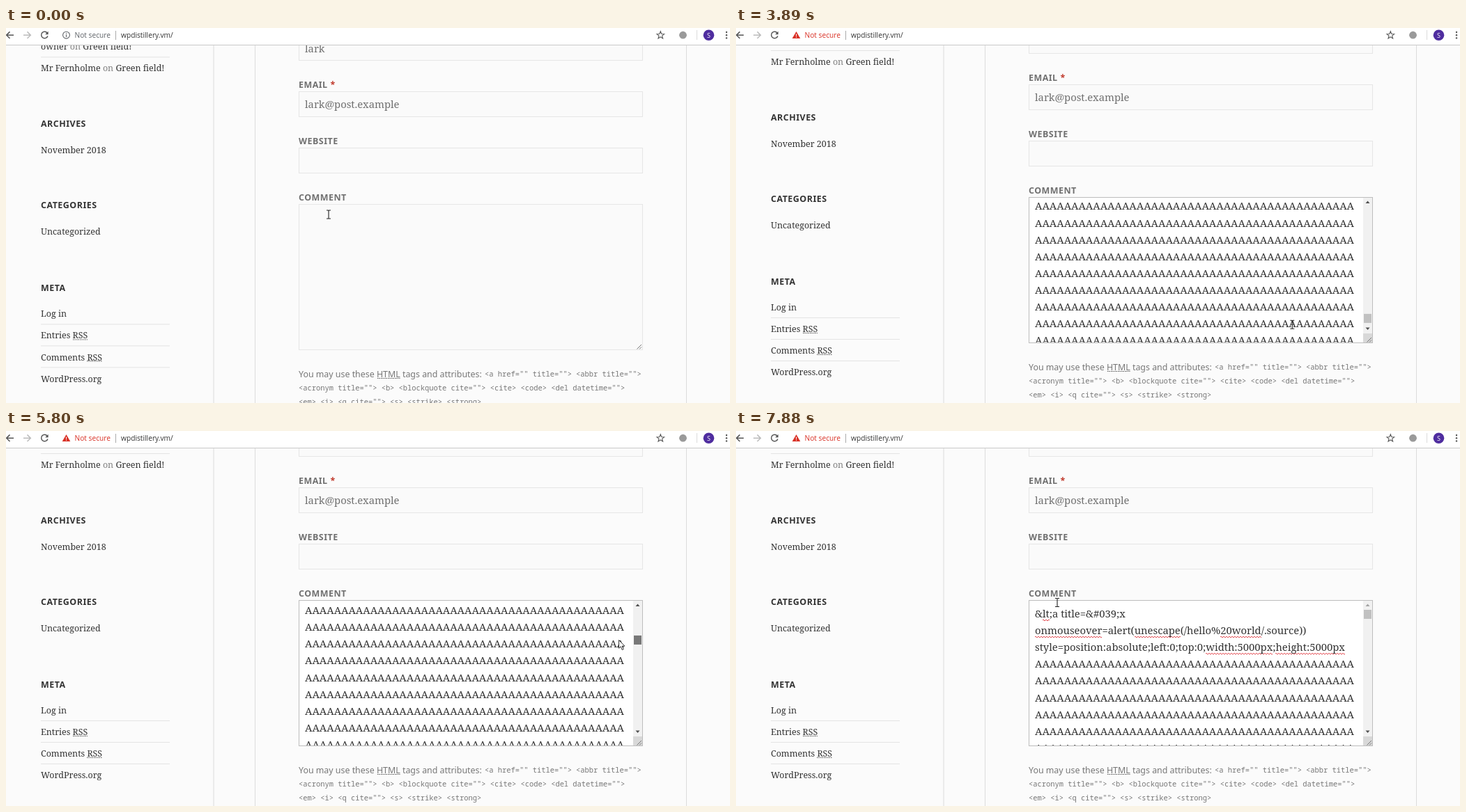
An HTML page that plays this animation: 1039x539 px, repeating every 8000 ms.

```html
<!DOCTYPE html>
<html lang="en">
<head>
<meta charset="utf-8">
<title>Comment form</title>
<style>
  html, body { margin: 0; width: 100%; height: 100%; overflow: hidden; background: #fbfbfb; }
  svg { position: absolute; left: 0; top: 0; }
  text { white-space: pre; }
  .serif { font: 12.48px "Noto Serif", serif; fill: #333; }
  .input { font: 14.77px "Noto Serif", serif; fill: #707070; }
  .head { font: bold 12.45px "Noto Sans", sans-serif; letter-spacing: .04em; fill: #333; }
  .label { fill: #707070; }
  .note { font: 12.4px "Noto Sans", sans-serif; fill: #777; }
  .code { font: 10.42px "Noto Sans Mono", monospace; fill: #777; }
  .bar { font: 10.2px "Open Sans", sans-serif; fill: #333; }
  .soft { fill: #808080; }
  .rule { stroke: #e4e4e4; }
  .dots { stroke: #555; stroke-dasharray: 1.5 1; }
  .field { fill: #fafafa; stroke: #e6e6e6; }
  .focus { fill: #fff; stroke: #bdbdbd; }
  #area { position: absolute; left: 421px; top: 244px; width: 479px; height: 208px; overflow: hidden; }
  #area div { position: absolute; left: 8px; top: 8.3px; white-space: pre; color: #333;
    font: 14.77px/20px "Noto Serif", serif; }
  #area u { text-decoration: none; padding-bottom: 1px;
    background: linear-gradient(90deg, #e2444a 50%, transparent 0) 0 calc(100% - 1px) / 4px 1px repeat-x,
      linear-gradient(90deg, #e2444a 50%, transparent 0) 2px 100% / 4px 1px repeat-x; }
  #area #caret { left: 7px; top: 9px; width: 1px; height: 20px; background: #222; }
</style>
</head>
<body>
<svg id="page" width="1039" height="539"></svg>
<div id="area"></div>
<svg id="top" width="1039" height="539"></svg>
<script>
const LOOP = 8000, STEP = 137;
const SCROLL = 140, FOCUS = 550, PASTE = 3090, MOVE = 3455, GRAB = 5370, DROP = 6740;
const LINE = 24.12, LAST = 1489, MAX = LAST - 7, WHEELED = MAX - 21.46;
const $ = id => document.getElementById(id);
const esc = s => s.replace(/&/g, '&amp;').replace(/</g, '&lt;');

const label = (x, y, s, cls, id = '') => `<text id="${id}" x="${x}" y="${y}" class="${cls}">${s}</text>`;
const rule = (x1, x2, y, cls = 'rule') => `<path d="M${x1} ${y}H${x2}" class="${cls}"/>`;
const field = (y, h, id = '') =>
  `<rect id="${id}" class="field" x="420.5" y="${y}" width="493" height="${h}"/>`;
const entry = (y, who) =>
  label(50, y, `${who}<tspan class="soft"> on </tspan>Green field!`, 'serif');

// A heading with ruled links below it
const widget = (y, title, links) => label(50, y, title, 'head') + links.map((s, i) =>
  label(50, y + 37.5 + 31.1 * i, s, 'serif') +
  (i ? rule(50, 235, Math.round(y + 16.6 + 31.1 * i) + .5) : '')).join('');

const side = [
  entry(22, 'owner'), rule(50, 235, 32.5), entry(52.6, 'Mr Fernholme'),
  widget(133, 'ARCHIVES', ['November 2018']),
  widget(250, 'CATEGORIES', ['Uncategorized']),
  widget(368.5, 'META', ['Log in', 'Entries RSS', 'Comments RSS', 'WordPress.org']),
  rule(96, 117, 438.5, 'dots'), rule(116, 138, 469.5, 'dots')
].join('');

const tags = [
  '<a href="" title=""> <abbr title="">',
  '<acronym title=""> <b> <blockquote cite=""> <cite> <code> <del datetime="">',
  '<em> <i> <q cite=""> <s> <strike> <strong>'
];
const form = [
  field(.5, 36), label(429, 25, 'lark', 'input'),
  label(420, 76.3, 'EMAIL <tspan fill="#c0392b">*</tspan>', 'head label'),
  field(81.5, 36), label(429, 104.8, 'lark@post.example', 'input'),
  label(420, 157, 'WEBSITE', 'head label'), field(162.5, 36),
  label(420, 238, 'COMMENT', 'head label'), field(243.5, 209, 'box'),
  label(420, 491.7, 'You may use these HTML tags and attributes:', 'note'),
  rule(533, 566, 493.5, 'dots'),
  ...tags.map((s, i) => label(i ? 420 : 687, 491.3 + 19.6 * i, esc(s), 'code'))
].join('');

$('page').innerHTML = `
  <path d="M298 24V539M357.5 24V539M976.5 24V539" stroke="#dcdcdc"/>
  <g id="side">${side}</g><g id="form">${form}</g>`;

const star = Array.from({ length: 10 }, (_, i) => {
  const r = i % 2 ? 2.4 : 5.6, a = i * Math.PI / 5;
  return `${939.3 + r * Math.sin(a)},${10.4 - r * Math.cos(a)}`;
}).join(' ');
const menu = [-1, 0, 1].map(i => `<circle cx="1034" cy="${10.2 + 4.2 * i}" r="1.2" fill="#555"/>`).join('');

$('top').innerHTML = `
  <g id="scroll">
    <path d="M900 244H913V439H900Z" fill="#f1f1f1"/>
    <path d="M900 439H913V452H900Z" fill="#d8d8d8"/>
    <path id="up" d="M903.5 252L906.5 248.5L909.5 252Z"/>
    <path id="down" d="M903.5 430.5L906.5 434L909.5 430.5Z"/>
    <rect id="thumb" x="901" width="11" height="13"/>
  </g>
  <path id="grip" d="M905.5 451.5L912 445M909 451.5L912 448.5" stroke="#777"/>
  <path id="arrow" d="M.5 .5V12.3L3.2 9.8L5.2 14.5L7.2 13.7L5.2 9.1H8.9Z"
    fill="#fff" stroke="#222" stroke-width=".9"/>
  <path id="beam" d="M-3 -6H-.8L0 -5.4L.8 -6H3M0 -5.4V5.4M-3 6H-.8L0 5.4L.8 6H3"
    fill="none" stroke="#222" stroke-width="1.1"/>
  <path d="M0 0H1039V24H0Z" fill="#fff"/>
  <path d="M0 24.5H1039" stroke="#c9c9c9"/>
  <g fill="none" stroke-width="1.5">
    <path d="M11 10.2H1M5.5 5.4L.7 10.2L5.5 15" stroke="#555"/>
    <path d="M25 10.2H35M30.5 5.4L35.3 10.2L30.5 15" stroke="#bcbcbc"/>
    <path d="M59.2 7.2A4.7 4.7 0 1 0 59.9 11.4" stroke="#555"/>
    <polygon points="${star}" stroke="#555" stroke-width="1.1"/>
  </g>
  <path d="M60.6 4.8V9.2H56.2Z" fill="#555"/>
  <g id="info"><circle cx="86.5" cy="10.2" r="4.9" fill="none" stroke="#5f6368" stroke-width="1.1"/>
    <path d="M86.5 9.4V13M86.5 7.2V8.4" stroke="#5f6368" stroke-width="1.2"/></g>
  <g id="warn"><path d="M86.5 5L92.3 15H80.7Z" fill="#d93025"/>
    <path d="M86.5 8.4V11.6M86.5 12.5V13.7" stroke="#fff" stroke-width="1.1"/></g>
  ${label(98.5, 14, 'Not secure', 'bar', 'secure')}
  <path d="M157.5 4V17" stroke="#aaa"/>
  ${label(165, 14, 'wpdistillery.vm/', 'bar')}
  <circle cx="971.5" cy="10.2" r="5.4" fill="#9a9a9a"/>
  <path d="M991.5 3V17" stroke="#dcdcdc"/>
  <circle cx="1008.5" cy="10.2" r="7.8" fill="#4f2d9f"/>
  <text x="1008.5" y="13.5" text-anchor="middle" class="bar" style="fill:#fff;font-size:9px">S</text>
  ${menu}`;

// Pasted text: three lines of markup, then filler
const intro = [
  '&amp;<u>lt</u>;a title=&amp;#039;x',
  '<u>onmouseover</u>=alert(<u>unescape</u>(/hello%<u>20world</u>/.source))',
  'style=position:absolute;left:0;top:0;<u>width:5000px</u>;<u>height:5000px</u>'
];
const lineAt = i => i < 0 || i > LAST ? '' : intro[i] || 'A'.repeat(i === LAST ? 8 : 44);

const addRow = () => $('area').appendChild(document.createElement('div'));
const rows = Array.from({ length: 11 }, addRow);
const caret = addRow();
caret.id = 'caret';

// Key points of the pointer: step, x, y
const path = [
  [-1, 463, 268], [0, 475, 283], [4, 906, 474], [7, 851, 311], [10, 908.5, 408],
  [12, 910, 416], [14, 910, 416], [17, 879, 300], [21, 876, 263], [23, 878, 257],
  [24, 640, 146], [25, 539, 164], [27, 500, 223], [30, 453, 259], [31, 457, 288], [32, 461, 246.5]
];

function pointerAt(step) {
  const i = path.findIndex(p => p[0] >= step);
  if (i < 1) return path.at(i).slice(1);
  const [s0, x0, y0] = path[i - 1], [s1, x1, y1] = path[i];
  const k = (step - s0) / (s1 - s0);
  return [x0 + (x1 - x0) * k, y0 + (y1 - y0) * k];
}

// Scroll position in lines: paste to the end, six wheel notches, then the thumb follows the pointer
function scrollAt(t, step, y) {
  if (t < PASTE || t >= DROP) return 0;
  if (t < GRAB) return MAX + (WHEELED - MAX) * Math.min(Math.max(step, 0) / 6, 1);
  return WHEELED * Math.max(y - 263, 0) / (416 - 263);
}

const show = (el, on) => { el.style.display = on ? '' : 'none'; };
const move = (el, x, y) => el.setAttribute('transform', `translate(${x} ${y})`);
const fill = (id, color) => $(id).setAttribute('fill', color);

function draw(t) {
  const step = Math.max(-1, Math.floor((t - MOVE) / STEP));
  const [x, y] = pointerAt(step);
  const pos = scrollAt(t, step, y), first = Math.floor(pos) - 1;
  const pasted = t >= PASTE, drag = t >= GRAB && t < DROP;

  const shift = t < SCROLL ? 10 : 0;
  move($('side'), 0, shift * .94);
  move($('form'), 0, shift);
  move($('grip'), 0, shift);
  $('box').setAttribute('class', t >= FOCUS ? 'focus' : 'field');

  rows.forEach((row, k) => {
    const html = pasted ? lineAt(first + k) : '';
    if (row.last !== html) row.innerHTML = row.last = html;
    row.style.transform = `translateY(${(first + k - pos) * LINE}px)`;
  });

  const blink = (t - FOCUS + 40) % 1000 < 550;
  show(caret, pasted || t >= FOCUS && blink);
  caret.style.transform = pasted ? `translate(84px, ${(LAST - pos) * LINE}px)` : '';

  const thumb = 257 + 155 * pos / MAX;
  const hover = x > 901 && y > thumb && y < thumb + 13;
  show($('scroll'), pasted);
  $('thumb').setAttribute('y', thumb);
  fill('thumb', drag ? '#787878' : hover ? '#a8a8a8' : '#c1c1c1');
  fill('up', pos > 0 ? '#505050' : '#a3a3a3');
  fill('down', pos < MAX ? '#505050' : '#a3a3a3');

  show($('info'), !pasted);
  show($('warn'), pasted);
  $('secure').style.fill = pasted ? '#d93025' : '#5f6368';

  const inField = x > 420 && x < 900 && (y > 243 && y < 453 || y > 162 && y < 199);
  const beam = inField && !drag;
  show($('arrow'), !beam);
  show($('beam'), beam);
  move($(beam ? 'beam' : 'arrow'), x, y);
}

function tick() {
  draw(performance.now() % LOOP);
  requestAnimationFrame(tick);
}
tick();
</script>
</body>
</html>
```
